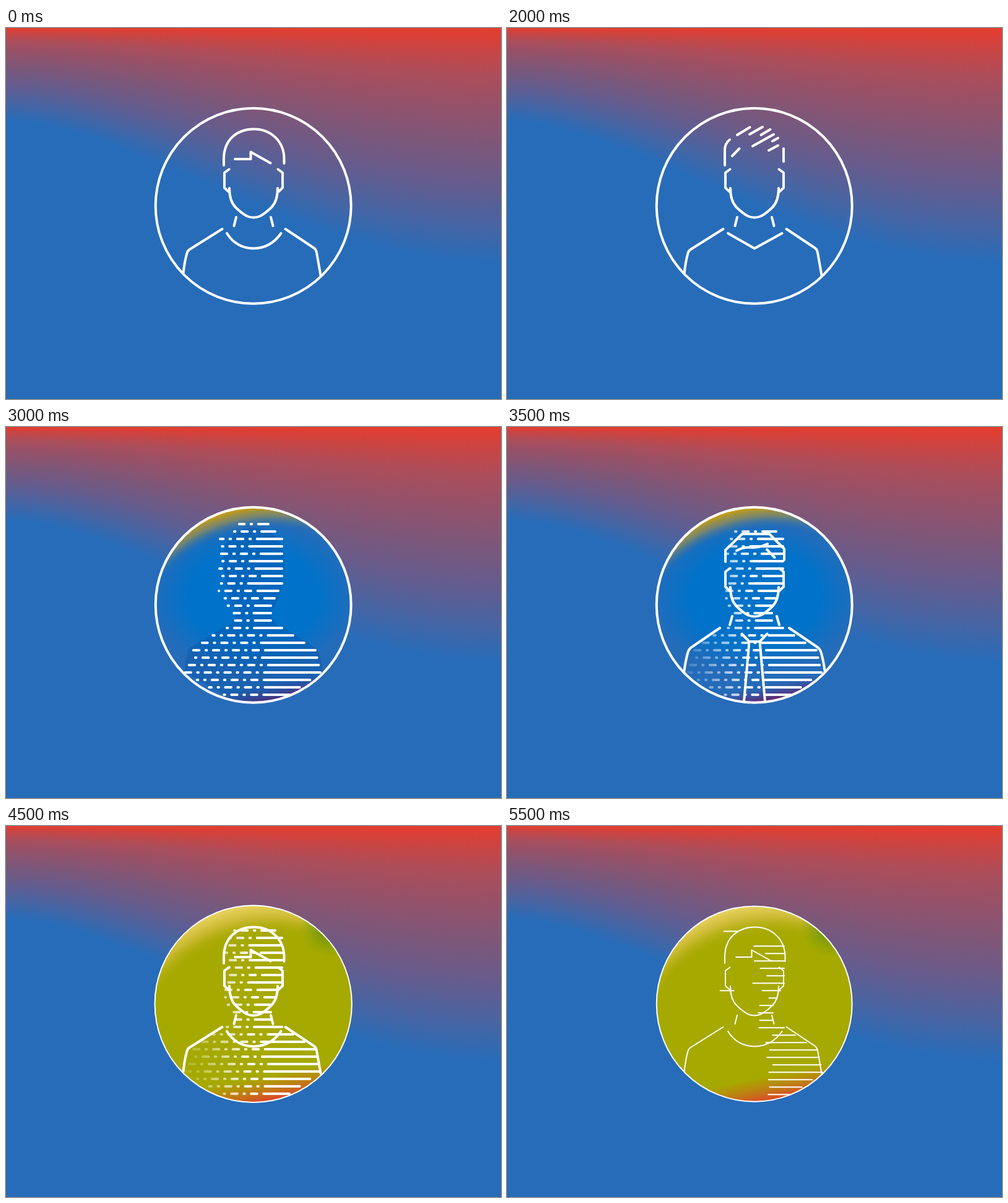
These frames come from a looping animation (800x600 px, 6 s). An HTML page with a canvas:

```html
<!DOCTYPE html>
<html>
<head>
<meta charset="utf-8">
<style>
html, body { margin: 0; width: 100%; height: 100%; overflow: hidden; background: #276cb9 }
canvas { display: block }
</style>
</head>
<body>
<canvas id="stage" width="800" height="600"></canvas>
<script>
const c = document.getElementById('stage').getContext('2d');
const CX = 399.7, CY = 287.7;

// a path plus its reflection in the vertical middle line
function mirrored(d) {
  const half = new Path2D(d), p = new Path2D(half);
  p.addPath(half, new DOMMatrix([-1, 0, 0, 1, 800, 0]));
  return p;
}

const join = (...parts) => {
  const p = new Path2D();
  parts.forEach(part => p.addPath(typeof part === 'string' ? new Path2D(part) : part));
  return p;
};

const head = mirrored('M361 259C361 272 364 283 371 290Q381 300 390 304.5Q395 306.5 400 306.5M360.5 228.5L353 234V258.5L360 265');
const body = join(mirrored('M372 306L368.5 320'),
  'M349.5 325L297 358Q293.5 360 292.5 364Q288.5 378 286.5 397M451.5 325L498 356Q501.5 359 502 363L508.5 400');
const suit = mirrored('M364 306L360 320M344 325L297 357Q293.5 360 292.5 364Q288.5 378 286 397' +
  'M379.5 334.5L391.5 347H400M391.5 347L383 444');

const people = {
  crew: join(head, body, 'M352 222V212C352 180 374 163.5 400.5 163.5C428 163.5 449.5 183 449.5 212V219',
    'M370 212H395.5V200.5L427.5 218.5M357 332Q372 356 400 356.5Q428 356 444.5 332'),
  bob: join(head, body, 'M345 276L340 264M337 251Q334 240 334 229M335 217C337 185 360 163 395 163C412 163 427 173 428.5 187',
    'M428.5 187C455 188 467 210 467 236C467 253 463 264 456 274M390 203C398 203 400 206 405 209Q410 212 426 212'),
  tie: join(head, suit, 'M353 218V199L380 173H424L448 197V215',
    'M371 200C384 193 388 195 397 195C407 195 413 193 421 189M420 198L432.5 211'),
  spiky: join(head, body, 'M352 222V197Q352 187 360 180.5M364 207L375.5 195M372 173L392.5 160.5M392 172L413 160M410.5 173L425.5 164',
    'M397 191L431 172M429 183L438 178M423 198L438 190M447 195V216M357 332L400 356.5L444.5 332')
};

const shade = new Path2D('M289 397Q291 362 297 357L350 325Q372 318 372 300Q352 270 352 212C352 180 374 163 400 163' +
  'C428 163 449 183 449 212Q449 270 428 300Q428 318 450 325L498 356Q509 362 513 400L400 460Z');

const rnd = n => {
  const v = Math.sin(n * 12.9898) * 43758.5453;
  return v - Math.floor(v);
};

// linear interpolation through a few [y, x] points
function along(points, y) {
  const i = Math.max(1, points.findIndex(p => p[0] >= y));
  const [[y0, x0], [y1, x1]] = [points[i - 1], points[i]];
  return x0 + (x1 - x0) * (y - y0) / (y1 - y0);
}
const leftEdge = [[157, 375], [181, 344], [265, 342], [313, 366], [361, 298], [397, 287], [433, 346]];
const rightEdge = [[157, 426], [181, 448], [253, 448], [289, 430], [313, 430], [361, 502], [397, 510], [433, 460]];

function seg(x1, x2, y, w) {
  c.beginPath();
  c.moveTo(x1 + w / 2, y);
  c.lineTo(x2 - w / 2, y);
  c.stroke();
}

// each row: a solid run at the right, then short and long dashes in turn towards the left
function stripes(kind, w) {
  for (let y = kind === 'full' ? 157 : 169, i = 0; y <= 433; y += 12, i++) {
    const right = along(rightEdge, y);
    const solid = 388 + 34 * rnd(y) + Math.max(0, y - 361) / 4;
    if (kind === 'sparse') {
      if (i > 1) seg(Math.min(solid + 8, right - 12), right, y + 1.2, 0);
      if (rnd(y + 1) < .25) seg(solid - 60, solid - 38, y + 1.2, 0);
      continue;
    }
    seg(solid, right, y, w);
    let left = along(leftEdge, y);
    if (kind === 'fade' && y < 320) left = Math.max(left, 352);
    let long = rnd(y + 2) < .3;
    for (let x = solid - 6.5; x > left + 4; long = !long) {
      const start = Math.max(left, x - (long ? 13.5 : 5.5));
      seg(start, x, y, w);
      x = start - 6.5;
    }
  }
}

function wash(g, stops) {
  stops.forEach(([p, col]) => g.addColorStop(p, col));
  c.fillStyle = g;
  c.fillRect(200, 100, 400, 400);
}
const rise = (a, b) => c.createLinearGradient(.2 * a, .98 * a, .2 * b, .98 * b);
const glow = (x, y, a, b) => c.createRadialGradient(x, y, a, x, y, b);

function fillDisc(olive) {
  c.fillStyle = olive ? '#a6a900' : '#246cba';
  c.fillRect(200, 100, 400, 400);
  if (olive) {
    wash(glow(430, 400, 222, 272), [[0, '#a6a90000'], [.6, '#cbb932'], [1, '#e6d05c']]);
    wash(glow(526, 160, 8, 52), [[0, '#4f9010'], [1, '#7b9c0800']]);
    wash(rise(480, 521), [[0, '#c8781000'], [.5, '#c47218c0'], [1, '#e23f2b']]);
  } else {
    c.save();
    c.translate(CX, 275);
    c.scale(1, .75);
    c.translate(-CX, -275);
    wash(glow(CX, 275, 105, 165), [[0, '#0072c9'], [1, '#246cba']]);
    c.restore();
    wash(glow(430, 400, 236, 273), [[0, '#246cba00'], [.55, '#9a9050b0'], [1, '#cfa008']]);
    wash(rise(490, 522), [[0, '#3050a000'], [1, '#800c54']]);
  }
}

const back = document.createElement('canvas');
back.width = 800;
back.height = 600;
(() => {
  const b = back.getContext('2d');
  const stops = [[0, '#e63d2f'], [.1, '#c84544'], [.2, '#ad4d5a'], [.3, '#9b5065'],
    [.5, '#7d5779'], [.68, '#645c8e'], [.85, '#4665a4'], [1, '#276cb9']];
  for (let x = 0; x < 800; x++) {
    const u = x / 800;
    const depth = 150 + 115 * (1 - Math.cos(Math.PI * u ** .85));
    const g = b.createLinearGradient(0, 0, 0, depth);
    stops.forEach(([p, col]) => g.addColorStop(p ** (1.25 - .25 * u), col));
    b.fillStyle = g;
    b.fillRect(x, 0, 1, 600);
  }
})();

const scenes = [
  { who: 'crew' },
  { who: 'bob' },
  { who: 'tie' },
  { who: 'bob' },
  { who: 'spiky' },
  { who: 'spiky', disc: 'blue', lines: 'fade' },
  { disc: 'blue', lines: 'full' },
  { who: 'tie', disc: 'blue', lines: 'fade' },
  { who: 'bob', disc: 'blue', lines: 'fade' },
  { who: 'crew', disc: 'olive', lines: 'fade', ring: 2, r: 159.2 },
  { who: 'crew', disc: 'olive', lines: 'fade', ring: 2, pen: 3 },
  { who: 'crew', disc: 'olive', lines: 'sparse', ring: 2, pen: 2 }
];

function draw({ who, disc, lines, ring = 4, pen = 4, r = 158 }) {
  c.drawImage(back, 0, 0);
  c.lineCap = c.lineJoin = 'round';
  c.save();
  c.beginPath();
  c.arc(CX, CY, r, 0, 7);
  c.clip();
  if (disc) fillDisc(disc === 'olive');
  if (lines === 'full') {
    c.fillStyle = 'rgba(0, 75, 160, .3)';
    c.fill(shade);
  }
  c.lineWidth = pen;
  c.strokeStyle = '#fff';
  if (lines === 'fade') {
    const g = c.createLinearGradient(290, 0, 405, 0);
    g.addColorStop(0, 'rgba(255, 255, 255, .1)');
    g.addColorStop(1, '#fff');
    c.strokeStyle = g;
  }
  if (lines) stripes(lines, pen);
  c.strokeStyle = '#fff';
  if (who) c.stroke(people[who]);
  c.restore();
  c.strokeStyle = '#fff';
  c.lineWidth = ring;
  c.beginPath();
  c.arc(CX, CY, r, 0, 7);
  c.stroke();
}

function tick() {
  draw(scenes[Math.floor(performance.now() / 500) % scenes.length]);
  requestAnimationFrame(tick);
}
tick();
</script>
</body>
</html>
```
